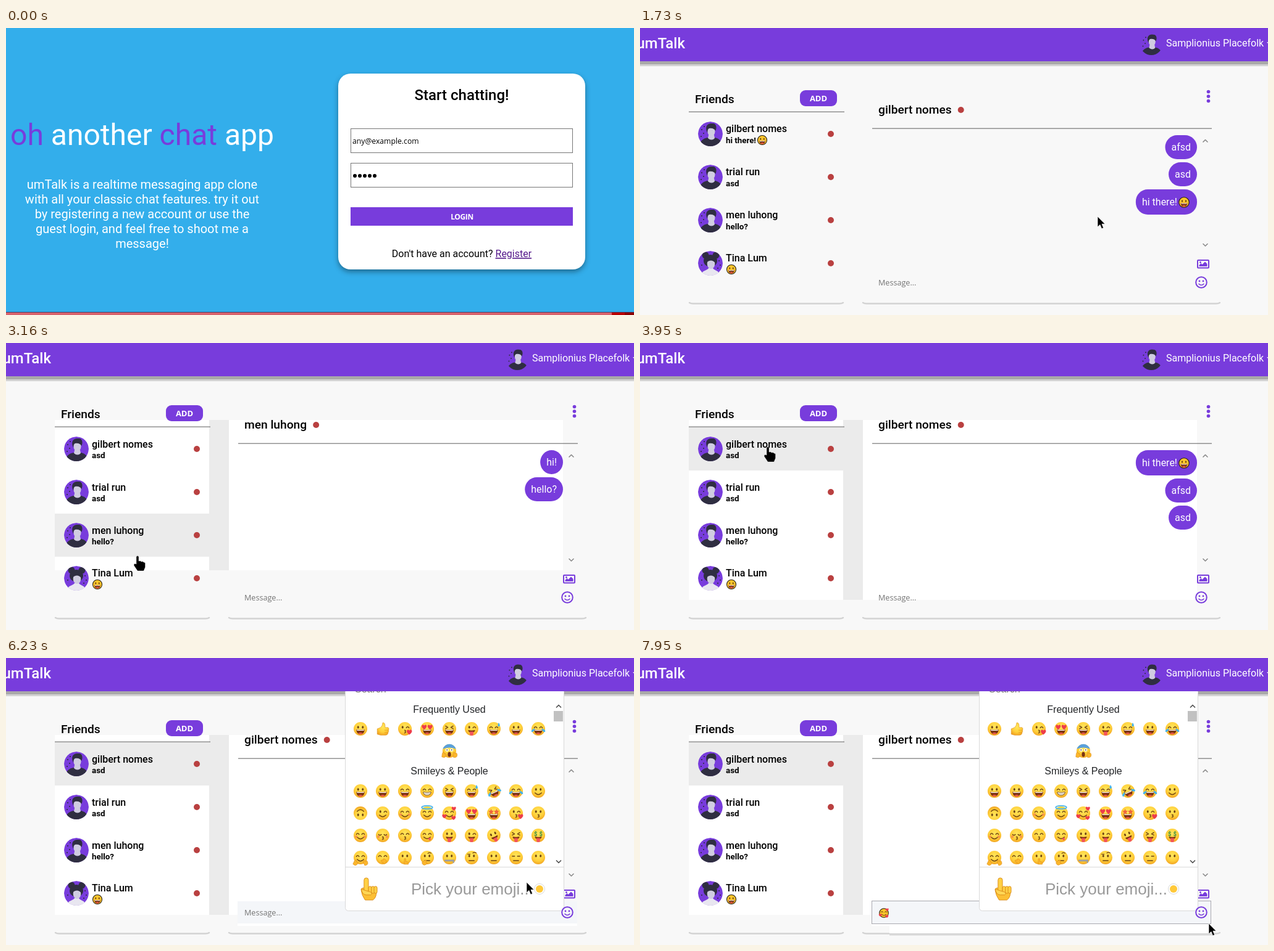
An HTML page that plays this animation: 1017x466 px, repeating every 8 s.

```html
<!DOCTYPE html>
<html lang="en">
<head>
<meta charset="utf-8">
<title>Chat app demo</title>
<style>
  html, body { margin: 0; width: 100%; height: 100%; overflow: hidden; background: #f8f8f8; }
  svg { display: block; width: 1017px; height: 466px; }
  text { font-family: Roboto, sans-serif; white-space: pre; }
  .ui { font-family: "Open Sans", "Noto Sans", sans-serif; }
  .pick { font-family: "Liberation Sans", Arial, sans-serif; }
  .mid { text-anchor: middle; }
  .end { text-anchor: end; }
  .med { font-weight: 500; }
  .bold { font-weight: 700; }
  .tight { letter-spacing: -.4px; }
  .card { filter: drop-shadow(0 4px 4px rgba(0, 0, 0, .38)); }
</style>
</head>
<body>
<svg viewBox="0 0 1017 466">
  <defs>
    <radialGradient id="skin" cx=".5" cy=".35" r=".68">
      <stop offset="0" stop-color="#ffe65c"/>
      <stop offset=".6" stop-color="#ffcf3a"/>
      <stop offset="1" stop-color="#f0a020"/>
    </radialGradient>
    <clipPath id="disc"><circle r="20"/></clipPath>
  </defs>
  <g id="stage"></g>
</svg>
<script>
const LOOP = 8000;
const PURPLE = '#783cdc', DARK = '#2f2e41', PALE = '#d0cde1', RED = '#b94040', GREY = '#ebebeb';
const BROWN = '#6d4314', HEART = '#ee3d4a';

// ---------- drawing helpers ----------
const T = (x, y, s, size, fill = '#000', cls = '') =>
  `<text x="${x}" y="${y}" font-size="${size}" fill="${fill}" class="${cls}">${s}</text>`;
const R = (x, y, w, h, fill, more = '') =>
  `<rect x="${x}" y="${y}" width="${w}" height="${h}" fill="${fill}" ${more}/>`;
const C = (x, y, r, fill, more = '') => `<circle cx="${x}" cy="${y}" r="${r}" fill="${fill}" ${more}/>`;
const P = (d, fill, more = '') => `<path d="${d}" fill="${fill}" ${more}/>`;
const L = (d, color, w = 1, more = '') =>
  P(d, 'none', `stroke="${color}" stroke-width="${w}" stroke-linecap="round" stroke-linejoin="round" ${more}`);
const G = (x, y, s, body, more = '') => `<g transform="translate(${x} ${y}) scale(${s}) ${more}">${body}</g>`;

const pen = document.createElement('canvas').getContext('2d');
const widthOf = (s, font) => { pen.font = font; return pen.measureText(s).width; };

// ---------- emoji, drawn in a circle of radius 10 ----------
const heart = (x, y, s) => G(x, y, s, P('M0 3C-6-1-2-5 0-1.8C2-5 6-1 0 3Z', HEART));
const star = (x, y) => G(x, y, 1, P('M0-4L1.2-1.2 4-1 1.9 1 2.6 4 0 2.4-2.6 4-1.9 1-4-1-1.2-1.2Z', '#f0643c'));
const both = f => f(-1) + f(1);
const dot = s => `<ellipse cx="${s * 3.4}" cy="-2.4" rx="1.3" ry="2" fill="${BROWN}"/>`;
const arc = (s, bend = -3.4) => L(`M${s * 4 - 2} -1.4q2 ${bend} 4 0`, BROWN, 1.3);
const bar = s => L(`M${s * 3.8 - 1.8} -2h3.6`, BROWN, 1.3);

const EYES = {
  d: () => both(dot),
  a: () => both(s => arc(s)),
  c: () => both(s => arc(s, 2.6)),
  w: () => dot(-1) + arc(1),
  h: () => both(s => heart(s * 4.3, -2.4, 1.15)),
  s: () => both(s => star(s * 4, -2.4)),
  x: () => both(s => L(`M${s * 5.6} -4.2L${s * 2.2} -2.2 ${s * 5.6} -.4`, BROWN, 1.3)),
  f: () => both(bar),
  m: () => both(s => T(s * 3.8, 1, '$', 8, '#2f8a43', 'mid bold')),
};
const MOUTHS = {
  o: () => P('M-6 1Q0 2 6 1C6.4 10.6-6.4 10.6-6 1Z', '#7a3312') + P('M-5.4 1.3Q0 2.2 5.4 1.3L5 2.8H-5Z', '#fff')
    + P('M-3.6 6.8Q0 4 3.6 6.8Q0 9.4-3.6 6.8Z', '#f0584a'),
  t: () => P('M-5.8 1.5Q0 2.6 5.8 1.5C5.4 8-5.4 8-5.8 1.5Z', '#fff', `stroke="${BROWN}" stroke-width=".8"`) + L('M-5 4.2H5', BROWN, .5),
  s: () => L('M-4.8 2.8Q0 7.6 4.8 2.8', BROWN, 1.3),
  p: () => P('M-5 1.8Q0 3 5 1.8C5 7-5 7-5 1.8Z', '#7a3312') + P('M-2.6 4H2.6V7.4a2.6 2.6 0 0 1-5.2 0Z', '#f4565a'),
  y: () => L('M-4.8 2.6Q0 7.4 4.8 2.6', BROWN, 1.3) + P('M1 4.8L4.6 3.2Q6.6 7 3.6 7.4Z', '#f4565a'),
  k: () => L('M-.6 2q3.4.4.6 2q3.2.8-.6 2.2', BROWN, 1.1),
  f: () => L('M-3.8 4.6H3.8', BROWN, 1.3),
  z: () => L('M-6 4.4H6', '#8b8f98', 2.4) + L('M-5.4 4.4H5.4', '#e3e6ea', .7, 'stroke-dasharray=".2 1.8"') + R(5, 4, 2, 4, '#9aa0aa'),
  n: () => '',
};
const EDGE = 'stroke="#d98a18" stroke-width=".5"';
const palm = (x, y, turn) => G(x, y, 1, P('M-2.6 4V-1Q-1-6 .6-1Q3.6-3 3.4 1Q3 6-2.6 4Z', '#fbb62c', EDGE), `rotate(${turn})`);
const EXTRAS = {
  b: () => both(s => C(s * 6.3, 2, 1.9, '#f47a50', 'opacity=".65"')),
  H: () => heart(6.6, 5, 1.2),
  T: () => both(s => P(`M${s * 5} -.5Q${s * 11.5} 1 ${s * 10} 4.5Q${s * 6.5} 5.5 ${s * 5} -.5Z`, '#43b4ee')),
  S: () => P('M7.2-9Q10.6-4.4 7.4-3.2Q4.4-4 7.2-9Z', '#43b4ee'),
  O: () => `<ellipse cy="-8.6" rx="8" ry="2.4" fill="none" stroke="#4cb4ea" stroke-width="1.6"/>`,
  3: () => heart(6.6, -6.6, 1) + heart(-7.4, 4.6, 1) + heart(6.2, 7, 1),
  W: () => palm(-7, 7, 25) + palm(7, 7, -25),
  M: () => palm(1, 5, -60),
  Q: () => P('M-1 10V2.5a1.2 1.2 0 0 1 2.4 0V6Q6 6 5 10Z', '#fbb62c', EDGE),
  Y: () => palm(-3, 7, 50) + L('M1-6q2-2 5-.4', BROWN, 1),
  E: () => L('M1.8-6.6q2-2 5-.2M-6-5h4', BROWN, 1),
  V: () => P('M-9.6-3A10 10 0 0 1 9.6-3Q0-7-9.6-3Z', '#5aa0dc') + both(s => C(s * 3.4, -1.6, 2.3, '#fff') + C(s * 3.4, -1.6, .9, BROWN))
    + `<ellipse cy="5" rx="2.4" ry="3.6" fill="#7a3312"/>` + palm(-8, 5, 8) + palm(8, 5, -8),
};
const knuckle = x => R(x, -2.4, 2.8, 6.4, '#ffd045', `rx="1.4" ${EDGE}`);
const pointUp = P('M-6.6 1Q-6.8-1-4-1H5Q7.4 0 7.2 3Q7 8 4 10H-3Q-6 6-6.6 1Z', '#fcbf34', EDGE)
  + R(-4, -10, 4, 13.5, '#ffd045', `rx="2" ${EDGE}`) + knuckle(0) + knuckle(2.6) + knuckle(5)
  + P('M-6.4 0Q-3 1.600 1.600 2.600Q4 4 2 5.400H-2Q-6 5-6.400 0Z', '#ffd655', EDGE);
const thumbUp = P('M-8 0L-3-2Q0-5 0-9Q4-10 3.6-2H8Q10 0 8.6 2Q9.4 4 8 5.4Q8 9 4 9.4H-3L-8 8Z', 'url(#skin)', EDGE)
  + L('M3 2H8M3 5.4H7.6', '#dd951c', .6);

function emoji(x, y, r, code, flat) {
  if (code === 'thumb' || code === 'up') return G(x, y, r / 10, code === 'up' ? pointUp : thumbUp);
  const [eyes, mouth, ...extra] = code;
  const turn = extra.includes('U') ? 180 : extra.includes('R') ? -25 : 0;
  const skin = flat ? C(0, 0, 9.4, '#fdc62b', 'stroke="#201a10" stroke-width="1.3"') : C(0, 0, 10, 'url(#skin)');
  const parts = [EYES[eyes], MOUTHS[mouth], ...extra.map(k => EXTRAS[k])];
  return G(x, y, r / 10, skin + parts.map(f => f ? f() : '').join(''), `rotate(${turn})`);
}

// ---------- avatars ----------
const man = [[-14, -7], [-11, -1], [-15, 4], [-10, -12]].map(([x, y]) => C(x, y, 1.1, DARK)).join('')
  + P('M-20 20C-16 9-8 6-4 6H7C14 7 19 12 20 20Z', DARK)
  + P('M-3 2L-4 7Q2 12 7 7L6 2Z', PALE) + `<ellipse cx="1.5" cy="-4" rx="6" ry="8" fill="${PALE}"/>`
  + P('M-5-2C-10-13-4-18 3-17C10-18 11-9 8-5C7-8 3-10-2-9Q-5-8-5-2Z', DARK);
const woman = [[14, -4], [16, 3], [12, 8], [-14, 3]].map(([x, y]) => C(x, y, 1.1, DARK)).join('')
  + C(-8, -13, 5.5, DARK) + C(9, -13, 5.5, DARK) + `<ellipse cx="0" cy="-4" rx="11" ry="10" fill="${DARK}"/>`
  + P('M-16 20C-14 11-5 12-3 8H4C6 12 14 11 16 20Z', '#e8e6f0')
  + `<ellipse cx="1" cy="1" rx="6.3" ry="8" fill="${PALE}"/>` + P('M-7 0Q-5-9 1-9Q8-8 8 0Q6-4 1-4.5Q-5-4-7 0Z', DARK);
const avatar = (x, y, s, who) => G(x, y, s, `<g clip-path="url(#disc)">${C(0, 0, 20, PURPLE)}${who}</g>`);

// ---------- login page ----------
const BLURB = ['umTalk is a realtime messaging app clone', 'with all your classic chat features. try it out',
  'by registering a new account or use the', 'guest login, and feel free to shoot me a', 'message!'];
const span = (s, color) => `<tspan fill="${color}">${s}</tspan>`;
const field = y => R(558.5, y + .5, 359, 39, '#fff', 'stroke="#767676"');

const login = R(0, 0, 1017, 466, '#33aeeb')
  + T(220.5, 190, `${span('oh', PURPLE)} another ${span('chat', PURPLE)} app`, 48, '#fff', 'mid')
  + BLURB.map((s, i) => T(220.5, 261 + 24 * i, s, 20, '#fff', 'mid')).join('')
  + R(538, 74, 400, 318, '#fff', 'rx="20" class="card"')
  + T(738, 117, 'Start chatting!', 24, '#000', 'mid med')
  + field(163) + T(561, 188, 'any@example.com', 12.2, '#000', 'ui')
  + field(219) + [0, 1, 2, 3, 4].map(i => C(565 + 8 * i, 240, 3, '#000')).join('')
  + R(558, 291, 360, 30, PURPLE) + T(738.5, 311, 'LOGIN', 12, '#fff', 'ui bold mid tight')
  + T(738, 372, `Don't have an account? <tspan fill="#551a8b" text-decoration="underline">Register</tspan>`, 16, '#000', 'mid')
  + R(0, 461, 1017, 1, '#4a3f68') + R(0, 462, 981, 4, '#d8626c') + R(981, 462, 21, 4, '#b80000') + R(1002, 462, 15, 4, '#8c0000');

// ---------- chat page ----------
const headerShadow = R(0, 59, 1017, 3, '#d3d3d3') + R(0, 54, 1017, 5, '#a9a9a9');
const header = R(0, 0, 1017, 54, PURPLE)
  + T(73, 33, 'umTalk', 24, '#fff', 'end med') + avatar(828, 26, .9, man)
  + T(852, 30, 'Samplionius Placefolk', 16, '#fff') + P('M1015 23h8l-4 4z', '#fff');

const FRIENDS = ['gilbert nomes', 'trial run', 'men luhong', 'Tina Lum'];
const base = (x0, x1) => L(`M${x0} 446q2 1.5 6 1.5H${x1 - 6}q4 0 6-1.5`, '#d3d3d3', 2.4);
const rowY = i => 172 + 70 * i;

function friendRow(i, early) {
  const y = rowY(i);
  const last = [early ? 'hi there!' : 'asd', 'asd', 'hello?', ''][i];
  return avatar(114, y, 1, i === 3 ? woman : man)
    + T(139, y - (early || i === 3 ? 3 : 2), FRIENDS[i], 16, '#000', 'med')
    + T(139, y + 15, last, 13.3, '#000', 'bold')
    + (i === 3 ? emoji(148, 392, 8, 'do', true) : i === 0 && early ? emoji(198, 182, 8, 'do', true) : '')
    + C(309, y, 5, RED);
}

function bubbles(list) {
  let top = 174;
  return list.map(s => {
    const face = s === 'hi there!';
    const h = face ? 41 : 39, w = widthOf(s, '16px Roboto') + (face ? 42 : 20), x = 902 - w, y = top;
    top += h + 5;
    return R(x, y, w, h, PURPLE, 'rx="19.5"') + T(x + 10, y + h / 2 + 5.5, s, 16, '#fff')
      + (face ? emoji(881, y + 21, 8.8, 'do', true) : '');
  }).join('');
}

const kebab = [103.5, 111, 118.5].map(y => C(920.5, y, 2.8, PURPLE)).join('');
const arrows = L('M912 185l3.5-3.5 3.5 3.5M912 350.5l3.5 3.5 3.5-3.5', '#8a8a8a', 1.6);
const photoIcon = R(903, 377, 18, 12.5, 'none', `rx="1" stroke="${PURPLE}" stroke-width="2"`)
  + P('M905.5 387v-2l3-3 2 2 4.500-4.500 3.500 3.500v4z', PURPLE) + C(907.5, 380.5, 1.4, PURPLE);
const smileIcon = C(909, 413, 8.8, 'none', `stroke="${PURPLE}" stroke-width="2"`)
  + C(906, 411, 1.4, PURPLE) + C(912, 411, 1.4, PURPLE) + L('M905 415.500q4 4 8 0', PURPLE, 1.6);

// ---------- emoji picker ----------
const GRID = [
  [115, 'do thumb wkH ho xo wp aoS do aoT'],
  [216, 'do do ao at xo aoS xoTR aoT ds'],
  [252, 'dsU ws asb asO as3 ho so wkH dk'],
  [288, 'asb ckb ak ay dp wp dpR xp mp'],
  [324, 'asW anM dnQ dfY dz dfE df ff dn'],
];
const picker = R(549.5, 30.5, 354, 380, '#fff', 'rx="5" stroke="#d9d9d9"')
  + T(565, 56, 'Search', 16, '#757575', 'pick')
  + T(718, 89, 'Frequently Used', 16, '#222427', 'pick mid') + T(718, 189, 'Smileys &amp; People', 16, '#222427', 'pick mid')
  + GRID.map(([y, row]) => row.split(' ').map((code, i) => emoji(574 + 36 * i, y, 11, code)).join('')).join('')
  + emoji(718, 151, 11, 'nnV')
  + R(887, 86, 15, 17, '#c1c1c1') + L('M891.500 80l3.500-3.500 3.500 3.500M891.500 329l3.500 3.500 3.500-3.500', '#505050', 1.7)
  + R(550, 339, 353, 1, '#d9d9d9');

const about = (code, lines, tag) => emoji(587, 375, 18, code)
  + lines.map((s, i) => T(754.5, 363 + 16 * i, s, 14, '#222427', 'pick mid')).join('')
  + T(754.5, 397, tag, 12.5, '#999', 'pick mid');
const FOOT = {
  idle: emoji(587, 375, 18, 'up') + T(656, 384, 'Pick your emoji...', 26, '#999', 'pick')
    + C(864, 375, 8.5, '#fff', 'stroke="#d9d9d9"') + C(864, 375, 6, '#ffc93a'),
  tongue: about('dp', ['Face with Stuck-Out Tongue'], ':stuck_out_tongue:'),
  hearts: about('as3', ['Smiling Face with Smiling Eyes and Three', 'Hearts'], ':smiling_face_with_3_hearts:'),
};

// ---------- pointer: start, end, steps, x, y ----------
const MOVES = [
  [580, 1430, 7, 741, 306],
  [2180, 2835, 5, 213, 346],
  [3310, 3310, 1, 214, 362],
  [3438, 3822, 4, 207, 169],
  [4520, 5310, 7, 900, 402],
  [5690, 5823, 2, 909, 412],
  [6089, 6620, 5, 721, 276],
  [6740, 6740, 1, 717, 256],
  [7130, 7250, 2, 406, 431],
  [7530, 7530, 1, 520, 414],
  [7670, 7950, 3, 921, 431],
];
function pointer(t) {
  let x = 674, y = 415;
  for (const [t0, t1, n, tx, ty] of MOVES) {
    if (t < t0) break;
    const k = n > 1 ? Math.min(n, 1 + Math.floor((t - t0) / ((t1 - t0) / (n - 1)) + 1e-6)) : 1;
    const u = k / n, e = u * u * (3 - 2 * u);
    x += (tx - x) * e;
    y += (ty - y) * e;
  }
  return { x: Math.round(x), y: Math.round(y) };
}
const CURSORS = {
  arrow: P('M0 0V17L4 13.400 6.600 19.800 9.600 18.500 7 12.300H12Z', '#000', 'stroke="#fff" stroke-width=".7"'),
  hand: P('M-2 1Q0-2 2 1V8Q5 7 6 9Q9 8 10 10Q13 10 12.500 13V18L10 24H0L-6 15Q-6 11-2 13Z', '#000', 'stroke="#fff" stroke-width=".4"'),
  beam: P('M-4-9H4V-7H1.200V7H4V9H-4V7H-1.200V-7H-4Z', '#000'),
};
const inside = (p, x0, y0, x1, y1) => p.x >= x0 && p.x <= x1 && p.y >= y0 && p.y <= y1;

function chatPage(t, p) {
  const early = t < 1880, open = t >= 5956, sent = t >= 7010;
  const second = t >= 3000 && t < 3950;
  const onList = inside(p, 79, 137, 329, 416);
  const hover = onList ? Math.floor((p.y - 137) / 70) : -1;
  const chosen = t < 3000 ? -1 : second ? 2 : 0;
  const patch = t < 3000 ? 0 : t < 3310 ? 244 : 292;
  const name = FRIENDS[second ? 2 : 0];
  const talk = second ? ['hi!', 'hello?'] : early ? ['afsd', 'asd', 'hi there!'] : ['hi there!', 'afsd', 'asd'];

  let s = R(0, 0, 1017, 466, '#f8f8f8') + headerShadow + base(80, 329) + base(361, 939);
  if (patch) s += R(79, 125, 250, patch, '#fff') + R(329, 125, 32, patch, GREY) + R(361, 125, 541, patch, '#fff');
  for (const i of new Set([hover, chosen])) if (i >= 0) s += R(79, rowY(i) - 35, 250, 70, GREY);
  s += T(89, 122, 'Friends', 19.2, '#000', 'med') + R(259, 101, 60, 26, PURPLE, 'rx="9"')
    + T(289, 119, 'ADD', 13, '#fff', 'ui bold mid') + R(79, 135.5, 252, 1.3, '#808080')
    + FRIENDS.map((_, i) => friendRow(i, early)).join('')
    + T(386, 139, name, 19.2, '#000', 'med') + C(401 + widthOf(name, '500 19.2px Roboto'), 133, 5, RED)
    + R(376, 162.5, 550, 1.3, '#808080') + kebab + bubbles(talk) + arrows;

  if (t >= 7530) s += R(404, 432, 523, 15, '#fff') + R(404, 447.500, 524, 3, '#d8d8d8');
  if (t >= 5823) s += R(375, 431, 550, 4, '#fff');
  if (t >= 5440) {
    const ring = t < 5823 || sent;
    s += ring ? R(375.5, 394.5, 549, 37, '#f4f6f9', 'stroke="#a9a9b0"') : R(375, 395, 550, 36, '#f4f6f9');
    if (t < 5823) s += R(386, 405, 1, 16, '#000');
  }
  s += sent ? emoji(395, 414, 7.8, 'as3', true) : T(386, 418, 'Message...', 12.6, '#757575', 'ui');
  s += photoIcon;
  if (open) s += picker + FOOT[t < 6620 || t >= 7130 ? 'idle' : t < 6740 ? 'tongue' : 'hearts'];
  s += smileIcon + header;

  const kind = onList || (t >= 5690 && inside(p, 902, 403, 918, 422)) ? 'hand'
    : inside(p, 375, open ? 411 : 395, 925, 430) ? 'beam' : 'arrow';
  return s + G(p.x, p.y, 1, CURSORS[kind]);
}

function loginPage(t, p) {
  if (t < 580) return login;
  return login + G(p.x, p.y, 1, CURSORS[inside(p, 558, 291, 918, 321) ? 'hand' : 'arrow']);
}

const stage = document.getElementById('stage');
let shown = '';
function draw() {
  const t = performance.now() % LOOP, p = pointer(t);
  const next = t < 1730 ? loginPage(t, p) : chatPage(t, p);
  if (next !== shown) stage.innerHTML = shown = next;
  requestAnimationFrame(draw);
}
draw();
</script>
</body>
</html>
```
